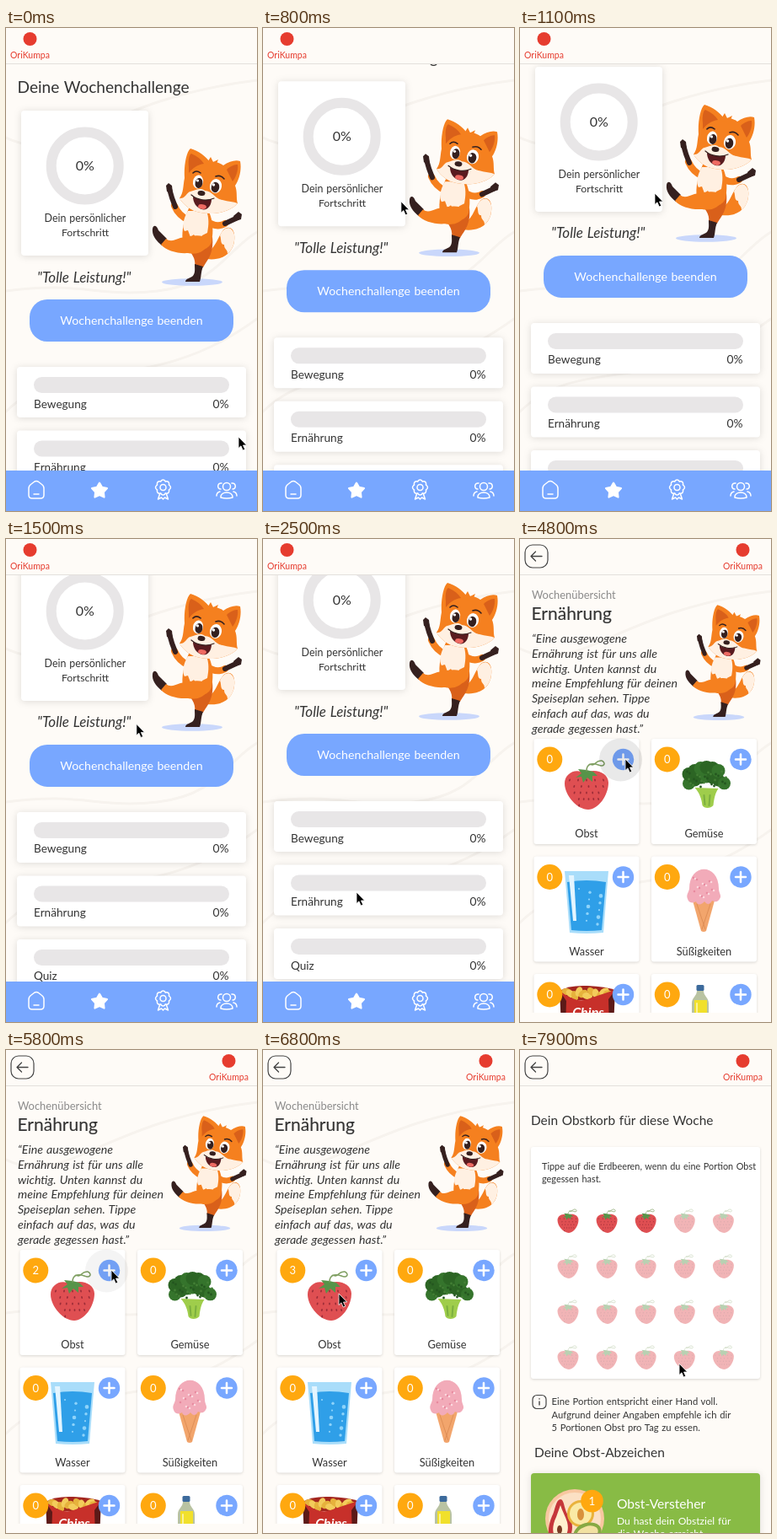
Recreate the animation shown at these times as an HTML page. Size 298 by 573 pixels, loop 8 s.

```html
<!DOCTYPE html>
<html lang="de">
<head>
<meta charset="utf-8">
<style>
html, body { margin: 0; width: 100%; height: 100%; overflow: hidden; background: #fefbf7; }
svg { display: block; width: 298px; height: 573px; font-family: Lato, "Open Sans", sans-serif; word-spacing: .05em; }
.card { fill: #fff; filter: drop-shadow(0 1px 4px #00000021); }
.tile { fill: #fff; filter: drop-shadow(0 1px 1.5px #00000026); }
.line { fill: none; stroke-linecap: round; stroke-linejoin: round; }
</style>
</head>
<body>
<svg id="stage" viewBox="0 0 298 573"></svg>
<script>
const INK = '#343434', BLUE = '#78a7ff', AMBER = '#ffa80f', RED = '#e63c2f', BG = '#fefbf7';
const ORANGE = '#f5801f', RUST = '#d9601a', DARK = '#35201f', CREAM = '#fff0e2';

const text = (x, y, size, str, extra = '') =>
  `<text x="${x}" y="${y}" font-size="${size}" fill="${INK}" ${extra}>${str}</text>`;
const mid = (x, y, size, str, fill = INK) =>
  text(x, y, size, str, `text-anchor="middle" style="fill:${fill}"`);
const lines = (x, y, step, size, rows, extra) =>
  rows.map((s, i) => text(x, y + i * step, size, s, extra)).join('');
const rect = (x, y, w, h, r, fill, extra = '') =>
  `<rect x="${x}" y="${y}" width="${w}" height="${h}" rx="${r}" fill="${fill}" ${extra}/>`;
const circle = (x, y, r, fill, extra = '') =>
  `<circle cx="${x}" cy="${y}" r="${r}" fill="${fill}" ${extra}/>`;
const oval = (x, y, rx, ry, fill, turn = 0) =>
  `<ellipse rx="${rx}" ry="${ry}" fill="${fill}" transform="translate(${x} ${y}) rotate(${turn})"/>`;
const shape = (d, fill) => `<path d="${d}" fill="${fill}"/>`;
const line = (d, color, w) => `<path class="line" d="${d}" stroke="${color}" stroke-width="${w}"/>`;
const at = (x, y, body, scale = 1, extra = '') =>
  `<g transform="translate(${x} ${y}) scale(${scale})" ${extra}>${body}</g>`;
const each = (n, fn) => Array.from({ length: n }, (_, i) => fn(i)).join('');

const waves = line('M0 130C70 165 110 85 298 62M0 312C90 300 110 320 180 312S260 265 298 242M0 455C70 385 170 440 298 345', '#f7f3ee', 3);
const logo = x => circle(x, 13, 8, RED) + mid(x, 35.5, 10.5, 'OriKumpa', RED);
const header = rect(0, 0, 298, 42, 0, BG) + rect(0, 42, 298, 1, 0, '#e3e0dc');
const backHeader = header + logo(264.5) +
  `<rect x="6" y="7" width="27" height="27" rx="9" fill="none" stroke="#444" stroke-width="1.2"/>` +
  line('M26 20.5H13M18.5 15L13 20.5L18.5 26', '#444', 1.3);

const fox =
  oval(221, 301.5, 36, 4.3, '#c9d7fb') +
  // tail
  shape('M234 266C248 266 250 250 257 241C262 234 270 236 271 245C273 262 262 277 238 274Z', ORANGE) +
  shape('M254 246C259 235 268 234 271 245C272 255 269 263 263 268C263 262 259 263 259 257C254 257 256 250 254 246Z', CREAM) +
  // legs
  shape('M213 256C218 266 226 272 224 282L234 284C239 275 247 268 245 248Z', RUST) +
  shape('M224 280L234 283C231 290 232 296 230 301H213C213 297 219 297 222 294C225 290 224 286 224 280Z', DARK) +
  shape('M174 238C175 233 179 234 181 240L191 250L185 258C178 252 173 246 174 238Z', DARK) +
  // arms
  line('M217 228C208 224 203 218 200 211', ORANGE, 8) +
  line('M201 212C198 205 196 199 194 191', DARK, 6) +
  shape('M191 194L190 187L193 184L197 187L198 196Z', DARK) +
  line('M238 229C246 235 253 236 260 232', ORANGE, 8) +
  line('M260 232L275 225', DARK, 6) +
  shape('M270 223L276 218L280 221L279 227L272 229Z', DARK) +
  // body
  shape('M217 214C211 228 208 242 210 254C220 268 240 266 244 254C247 238 245 225 239 214Z', ORANGE) +
  shape('M216 217C210 227 209 236 212 241L216 240L219 248L223 245L229 255L233 246L239 243C241 233 241 225 238 217Z', CREAM) +
  shape('M239 250C231 243 216 248 207 249C199 252 195 254 190 250L184 257C190 264 204 268 216 267C230 270 242 262 239 250Z', ORANGE) +
  // head
  shape('M212 178C211 164 214 147 219 143C229 146 237 152 242 159C248 158 254 160 258 163C265 158 273 156 278 158C280 168 277 180 272 187C275 194 273 202 275 208C265 219 246 222 231 219C219 217 211 210 206 202C211 195 210 188 212 178Z', ORANGE) +
  shape('M217 165C216 155 218 150 220 149C227 152 232 156 235 161C227 162 221 167 217 172Z', RUST) +
  shape('M262 168C267 163 272 162 275 162C276 169 273 177 269 182Z', RUST) +
  shape('M206 202C213 203 214 195 219 194C226 192 231 189 236 193C245 193 248 203 257 204C264 206 270 206 275 208C265 219 246 222 231 219C219 217 211 210 206 202Z', CREAM) +
  shape('M238 161L243 153L246 159L252 156L248 166Z', ORANGE) +
  oval(228, 182.5, 6, 8, '#fff', 10) + oval(249, 187.5, 7, 8.5, '#fff', 10) +
  oval(229, 184, 4.4, 6, DARK, 10) + oval(248.5, 189, 4.8, 6.2, DARK, 10) +
  circle(227.5, 181, 1.6, '#fff') + circle(246.5, 186, 1.7, '#fff') +
  line('M222 172Q226 168 231 172M249 176Q255 174 259 179', DARK, 1.6) +
  shape('M222 200C229 204 238 205 244 203C244 211 239 217 232 215C226 213 222 207 222 200Z', '#5a1b1f') +
  oval(233, 212, 5, 2.8, '#ee6a62', 10) +
  line('M220 198C227 204 238 206 247 202', DARK, 1.2) +
  oval(232, 196, 4.5, 3, DARK, 10);

const berry =
  shape('M-2-13C9-20 26-14 26-2C26 13 14 30 2 30C-11 30-26 13-26-1C-26-13-13-20-2-13Z', '#df4f52') +
  each(21, i => {
    const row = Math.floor(i / 5), x = (i % 5 - 2) * (10 - row * 1.4) + (row % 2 ? 2.5 : 0);
    return oval(x, -5 + row * 7.5, .9, 1.6, '#9c2d38', x * -1.2);
  }) +
  shape('M0-17L-10-18L-6-13L-13-8L-6-9L-4-2L1-8L7-3L7-10L13-10L8-15Z', '#579449') +
  line('M0-16C0-26 9-25 14-23C22-20 23-26 18-28C10-29 10-20 4-24', '#7f9f62', 1.5);

const broccoli =
  shape('M-14 5L14 6C10 12 9 18 8 26C5 30-3 30-5 26C-6 18-8 12-14 5Z', '#9fcd4b') +
  line('M-2 25L-3 14M3 26L4 14', '#7caf40', 2) +
  each(13, i => circle(-21 + (i % 7) * 7, (i < 7 ? 0 : -11) - 8 * Math.sin((i % 7) * .52), i < 7 ? 7.5 : 8, i % 3 ? '#2c6524' : '#35742c')) +
  each(26, i => circle(-23 + (i * 17 % 47), -14 + (i * 11 % 19), 1.4, i % 2 ? '#437f35' : '#24561f'));

const glass =
  shape('M-26-37H26L20 36Q0 38-20 36Z', '#a9ddfa') +
  shape('M-23-24Q0-28 23-24L18 33Q0 35-18 33Z', '#2f9fe8') +
  shape('M-21-32H-15L-12 22H-16Z', '#e4f5ff') +
  each(11, i => circle(-9 + (i * 13 % 27), -16 + i * 4.2, 1.1 + i % 3 * .6, '#8ed3fa'));

const iceCream =
  shape('M-13-1H13L3 35Q0 37-3 35Z', '#f2a56c') +
  line('M-8 3L2 33M8 3L-2 33', '#df8f57', 1) +
  shape('M-19-3C-21-8-18-10-17-15C-17-46 18-46 18-15C18-10 22-7 19-3C16 2 13 0 10-1C7 5 3 3 1 0C-3 5-8 4-9 0C-14 3-18 1-19-3Z', '#f2abb9') +
  each(18, i => circle(-12 + i * 11 % 25, -28 + i * 7 % 24, 1.3, ['#e88a9f', '#fbd9df'][i % 2]));

const chips =
  shape('M-33-2Q-22-9 0-8T33-3L30 9H-30Z', '#a3261f') +
  each(11, i => oval(-25 + i * 5, -1 + i % 3 * 2.5, 6, 4, i % 2 ? '#f3cc5b' : '#e6b23c', i * 37)) +
  shape('M-33-2Q-14 13 0 8T33-3L30 40H-30Z', '#c7302a') +
  shape('M-33-2L-25 10L-26 40H-31ZM33-3L25 8L26 40H31Z', '#5c1a18') +
  mid(1, 29, 16, '<tspan font-style="italic" font-weight="700">Chips</tspan>', '#fff');

const bottle =
  rect(-4.5, -9, 9, 7, 1.5, '#3c6a9c') +
  shape('M-4-2H4C4 4 10 6 10 13V40H-10V13C-10 6-4 4-4-2Z', '#b9c3a2') +
  shape('M-7 9H8V40H-7Z', '#f1e02b') + line('M-4 13V38', '#faf29a', 2);

// first page
const goals = ['Bewegung', 'Ernährung', 'Quiz', 'Schlaf'];
const challenge =
  text(13.5, 76.5, 19.1, 'Deine Wochenchallenge') +
  rect(18, 98, 151, 172, 4, '#fff', 'class="card"') +
  `<circle cx="93.7" cy="163.5" r="40" fill="none" stroke="#e8e6e7" stroke-width="12"/>` +
  mid(93.7, 169, 16, '0%') + mid(94, 230, 12.4, 'Dein persönlicher') + mid(94, 247, 12.3, 'Fortschritt') +
  fox +
  text(37, 301.5, 17, '"Tolle Leistung!"', 'font-style="italic"') +
  rect(28, 322, 242, 50, 21, BLUE) + mid(149, 352, 14.2, 'Wochenchallenge beenden', '#fff') +
  each(4, i => at(0, i * 75.5,
    rect(13, 402, 272, 60, 4, '#fff', 'class="card"') + rect(33, 414, 232, 19, 9.5, '#e8e6e7') +
    text(33, 450.5, 13.6, goals[i]) + text(264.5, 450.5, 13.8, '0%', 'text-anchor="end"')));

const star = each(10, i => {
  const a = (i * 36 - 90) * Math.PI / 180, r = i % 2 ? 5.2 : 9.5;
  return `${i ? 'L' : 'M'}${(r * Math.cos(a)).toFixed(2)} ${(r * Math.sin(a)).toFixed(2)}`;
}) + 'Z';
const petal = i => `<g transform="translate(0 -3) rotate(${i * 45})">${line('M-3-7Q0-11 3-7', '#fff', 1.5)}</g>`;
const ring = (y, r) => circle(0, y, r, 'none', 'stroke="#fff" stroke-width="1.5"');
const nav = rect(0, 525, 298, 48, 0, BLUE) +
  at(36, 548, line('M-9-2Q-9-5-6-7L-2-10Q0-11 2-10L6-7Q9-5 9-2V6Q9 10 5 10H-5Q-9 10-9 6ZM-3 5H3', '#fff', 1.5)) +
  at(111, 549, `<path d="${star}" fill="#fff" stroke="#fff" stroke-width="2" stroke-linejoin="round"/>`) +
  at(186.5, 548, each(8, petal) + ring(-3, 3.5) + line('M-4 5L-6 11L-2 9L0 11L2 9L6 11L4 5', '#fff', 1.5)) +
  at(262, 548, ring(-4, 4.5) +
    line('M-7 9C-8 1 8 1 7 9Q0 11-7 9M-6-8C-11-9-12-1-7-1M-8 2Q-12 3-12 7M6-8C11-9 12-1 7-1M8 2Q12 3 12 7', '#fff', 1.5));

// second page
const foods = [
  ['Obst', berry, 79, 291], ['Gemüse', broccoli, 221.5, 290], ['Wasser', glass, 79, 431],
  ['Süßigkeiten', iceCream, 218, 430], ['Snacks', chips, 80, 538], ['Öl', bottle, 214, 538]
];
const food = ([name, art, x, y], i) => {
  const dx = i % 2 * 139.5, dy = (i >> 1) * 139.5;
  return at(dx, dy,
    rect(16.5, 237, 125, 125, 3, '#fff', 'class="tile"') + mid(79, 354, 12.8, name)) +
    at(x, y, art) +
    at(dx, dy, circle(35.3, 261.5, 15, AMBER) +
      `<text x="35.3" y="266" font-size="13" fill="#fff" text-anchor="middle" ${i ? '' : 'id="count"'}>0</text>` +
      circle(122.5, 261.5, 12.7, BLUE) + line('M116.5 261.5H128.5M122.5 255.5V267.5', '#fff', 2.5));
};
const nutrition = backHeader +
  text(14, 70.5, 12.9, 'Wochenübersicht', 'style="fill:#8a8a8a"') +
  text(13.5, 96, 21, 'Ernährung', `stroke="${INK}" stroke-width=".15"`) +
  lines(14, 123, 17.75, 14.15, ['“Eine ausgewogene', 'Ernährung ist für uns alle', 'wichtig. Unten kannst du',
    'meine Empfehlung für deinen', 'Speiseplan sehen. Tippe', 'einfach auf das, was du', 'gerade gegessen hast.”'], 'font-style="italic"') +
  `<g transform="translate(236 211) scale(.84) translate(-221 -301)">${fox}</g>` +
  `<g clip-path="url(#list)">${foods.map(food).join('')}</g>` +
  circle(119.5, 262, 25.5, '#000', 'id="ripple" opacity="0"');

// third page
const medal =
  circle(65, 556, 35, '#f8c7a0') + circle(65, 556, 31, '#fbe0c4') +
  shape('M48 533C53 533 52 546 58 553C67 565 60 588 45 588C31 586 32 567 38 553C42 546 42 534 48 533Z', '#c5363a') +
  shape('M48 540C50 547 54 553 56 560C59 572 54 580 47 580C38 579 37 566 43 554Z', '#fff0cf') +
  oval(47, 569, 3, 5, '#7a3a24') +
  circle(72, 550, 16, '#e9b23c') + circle(72, 550, 13, '#fae9a5') + oval(72, 551, 4, 7, '#d8913d') +
  oval(80, 573, 17, 12, '#86a943', -18) + oval(80, 573, 13, 8, '#f2e1a2', -18) +
  circle(85.5, 535, 13.3, AMBER) + mid(85.5, 540, 13.5, '1', '#fff');
const basket = rect(0, 0, 298, 573, 0, BG) + backHeader +
  text(13, 88.5, 15.4, 'Dein Obstkorb für diese Woche') +
  rect(13, 115, 272, 275, 3, '#fff', 'class="tile"') +
  lines(26, 141.5, 15, 10.9, ['Tippe auf die Erdbeeren, wenn du eine Portion Obst', 'gegessen hast.']) +
  each(20, i => at(57 + i % 5 * 46.1, 202.5 + Math.floor(i / 5) * 54, berry, .48, i < 3 ? '' : 'opacity=".42"')) +
  `<rect x="15" y="409.5" width="16" height="16" rx="5" fill="none" stroke="#444" stroke-width="1.2"/>` +
  line('M23 417V421M23 413.7V414', '#444', 1.4) +
  lines(37.5, 421, 15.5, 11.25, ['Eine Portion entspricht einer Hand voll.', 'Aufgrund deiner Angaben empfehle ich dir', '5 Portionen Obst pro Tag zu essen.']) +
  text(17, 483, 15.5, 'Deine Obst-Abzeichen') +
  rect(13, 502, 272, 100, 4, '', 'class="card" style="fill:#88bb45"') + medal +
  text(115, 544, 15.6, 'Obst-Versteher', 'style="fill:#fff"') +
  lines(115, 562.5, 15.5, 12.1, ['Du hast dein Obstziel für', 'die Woche erreicht.'], 'style="fill:#fff"');

const stage = document.getElementById('stage');
stage.innerHTML =
  '<clipPath id="list"><rect y="230" width="298" height="332"/></clipPath>' +
  rect(0, 0, 298, 573, 0, BG) + waves +
  `<g class="page"><g id="scroll">${challenge}</g>${header}${logo(28.5)}${nav}</g>` +
  `<g class="page">${nutrition}</g><g class="page">${basket}</g>` +
  `<path id="cursor" d="M0 0V13.5L3 10.8L5.2 16L7.8 15L5.5 10H9.7Z" fill="#000" stroke="#fff" stroke-width=".8"/>`;

const [scroller, count, ripple, cursor] = ['scroll', 'count', 'ripple', 'cursor'].map(id => document.getElementById(id));
const pages = stage.querySelectorAll('.page');

// keys: [time, value, value, ...]
function track(keys, t, ease = u => u) {
  const n = keys.findIndex(k => k[0] > t);
  if (n < 0) return keys[keys.length - 1].slice(1);
  if (!n) return keys[0].slice(1);
  const a = keys[n - 1], b = keys[n], u = ease((t - a[0]) / (b[0] - a[0]));
  return a.slice(1).map((v, i) => v + (b[i + 1] - v) * u);
}
const smooth = u => u * u * (3 - 2 * u);
const scrollKeys = [[200, 0], [1100, 52], [1700, 91]];
const cursorKeys = [[0, 276, 485], [900, 160, 196], [1300, 160, 196], [2300, 111, 419], [2700, 111, 419],
  [3200, 132, 393], [4300, 125, 261], [6100, 125, 261], [6700, 90, 289], [7300, 90, 289], [7900, 189, 372]];
const taps = [4850, 5400, 5950];

function draw(now) {
  const t = now % 8000;
  const current = t < 2700 ? 0 : t < 7400 ? 1 : 2;
  pages.forEach((p, i) => p.style.display = i === current ? '' : 'none');
  scroller.setAttribute('transform', `translate(0 ${-track(scrollKeys, t)[0]})`);
  count.textContent = taps.filter(k => t >= k).length;
  const glow = Math.max(...taps.map(k => 1 - Math.abs(t - k + 50) / 200));
  ripple.setAttribute('opacity', Math.max(0, glow) * .085);
  cursor.setAttribute('transform', `translate(${track(cursorKeys, t, smooth)})`);
  requestAnimationFrame(() => draw(performance.now() - start));
}
const start = performance.now();
draw(0);
</script>
</body>
</html>
```
